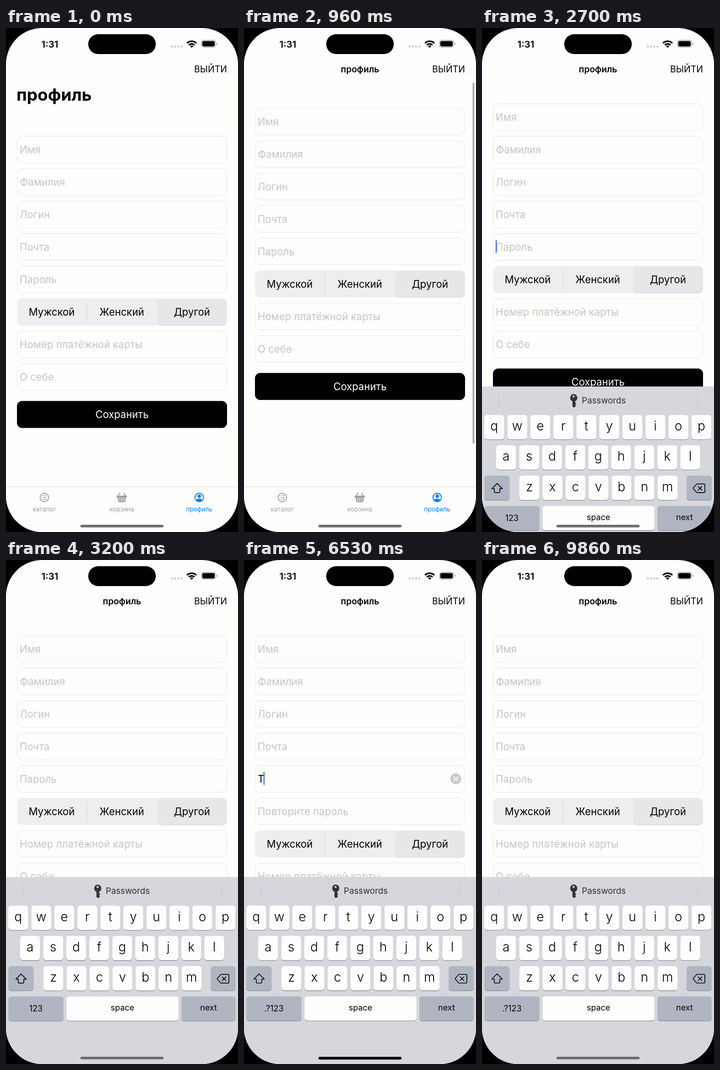
An HTML page that plays this animation: 508 px wide and 1102 px high, repeating every 9960 ms.

```html
<!DOCTYPE html>
<html lang="ru">
<head>
<meta charset="utf-8">
<title>Профиль</title>
<style>
  html, body { margin: 0; width: 100%; height: 100%; overflow: hidden; background: #000; }
  svg { display: block; width: 508px; height: 1102px; }
  text { font-family: Inter, "Noto Sans", sans-serif; font-size: 22.2px; fill: #000; }
  .hint { fill: #c5c5c8; }
  .mid { text-anchor: middle; }
  .box { fill: #fefefd; stroke: #e9e9eb; stroke-width: 1.2; }
  .tab { font-size: 13.6px; fill: #9f9f9f; text-anchor: middle; }
  .small { font-size: 18px; text-anchor: middle; }
  .lower { font-size: 28px; font-weight: 300; text-anchor: middle; }
  .upper { font-size: 25.5px; text-anchor: middle; }
  .line { fill: none; stroke-linecap: round; stroke-linejoin: round; }
</style>
</head>
<body>
<svg viewBox="0 0 508 1102">
  <defs>
    <clipPath id="screen"><rect width="508" height="1102" rx="79"/></clipPath>
    <clipPath id="below"><rect y="119" width="508" height="900"/></clipPath>
    <linearGradient id="grey" x2="0" y2="1">
      <stop stop-color="#484848"/><stop offset="1" stop-color="#939393"/>
    </linearGradient>
  </defs>
  <rect width="508" height="1102"/>
  <g clip-path="url(#screen)">
    <rect width="508" height="1102" fill="#fefefd"/>

    <g clip-path="url(#below)">
      <text id="bigTitle" x="23" y="158.500" style="font-size:37px;font-weight:700">профиль</text>
    </g>
    <text id="navTitle" class="mid" x="254" y="97" style="font-size:19.2px;font-weight:600">профиль</text>
    <text x="484" y="97" text-anchor="end" style="font-size:19.5px">ВЫЙТИ</text>

    <g id="form">
      <g id="fixed"></g>
      <g id="repeat"></g>
      <g id="rest"></g>
      <g id="typed">
        <text x="30" y="558">T</text>
        <circle cx="463.700" cy="549.500" r="11.800" fill="#c9c9cb"/>
        <path class="line" d="M459.500 545.300l8.400 8.400m0-8.400l-8.400 8.400" stroke="#fff" stroke-width="2"/>
      </g>
      <rect id="caret" y="534" width="2.400" height="29" rx="1.200" fill="#4873e6"/>
    </g>
    <rect id="bar" x="500.500" width="4" rx="2" fill="#a9a9ac"/>

    <g>
      <rect y="1003" width="508" height="99" fill="#fefefd"/>
      <rect y="1002.500" width="508" height="1.200" fill="#dededf"/>
      <g class="line" stroke="#9f9f9f" stroke-width="1.900">
        <circle cx="84" cy="1026.500" r="9.300"/>
        <path d="M82 1022.500h6.500m-6.500 4h6.500m-6.500 4h6.500M79 1022.500h.1m-.1 4h.1m-.1 4h.1" stroke-width="1.600"/>
        <path d="M249.500 1016.500l-4 7M257.500 1016.500l4 7"/>
      </g>
      <path d="M242 1022.500h23v3h-2l-2 9.500q-.4 1.800-2 1.800h-11q-1.600 0-2-1.800l-2-9.500h-2z" fill="#9f9f9f"/>
      <path class="line" d="M249 1027.500l.6 6m3.900-6v6m4.500-6l-.6 6" stroke="#fff" stroke-width="1.500"/>
      <circle cx="423" cy="1026.500" r="9.300" fill="none" stroke="#0a7cf5" stroke-width="2"/>
      <circle cx="423" cy="1023.800" r="3.800" fill="#0a7cf5"/>
      <path d="M416 1032.500q1.500-3.600 7-3.600t7 3.600q-3 3.300-7 3.300t-7-3.300z" fill="#0a7cf5"/>
      <text class="tab" x="84" y="1057">каталог</text>
      <text class="tab" x="253.500" y="1057">корзина</text>
      <text class="tab" x="423" y="1057" style="fill:#0a7cf5">профиль</text>
    </g>

    <g id="board">
      <rect width="508" height="420" fill="#d5d7dd"/>
      <path d="M36.500 16v29.500M472 16v29.500" stroke="#c1c3c9" stroke-width="1.200"/>
      <path fill-rule="evenodd" fill="#333437" d="M200.500 16.500a8.300 8.300 0 0 1 3.500 15.800v2.700l2.500 2.500-2.500 2.700 2 2.300-4.600 4-3.400-3.200v-11a8.300 8.300 0 0 1 2.500-15.800zm0 3a2.300 2.300 0 1 0 .01 0z"/>
      <text x="218.500" y="37" style="font-size:18.700px;fill:#2e2f32">Passwords</text>
      <g id="keys"></g>
      <g id="lower"></g>
      <g id="upper"></g>
      <path id="shift" class="line" d="M33 212l11.500 11.500h-5.500v7q0 1.500-1.500 1.500h-9q-1.500 0-1.500-1.500v-7h-5.500z" stroke="#000" stroke-width="1.700"/>
      <path class="line" d="M470.500 213h15q2.500 0 2.500 2.500v14q0 2.500-2.500 2.500h-15l-7.500-8.200q-1-1.300 0-2.600zM473.500 218.500l8 8m0-8l-8 8" stroke="#000" stroke-width="1.700"/>
      <text id="digits" class="small" x="65.500" y="294"></text>
      <text class="small" x="255" y="292">space</text>
      <text class="small" x="443.500" y="292">next</text>
    </g>

    <text x="96" y="42.500" class="mid" style="font-size:20.5px;font-weight:600">1:31</text>
    <rect x="180" y="13.500" width="148" height="43.500" rx="21.750"/>
    <path class="line" d="M363 40.500h.01m6.990 0h.01m6.990 0h.01m6.990 0h.01" stroke="#cfcfcf" stroke-width="4.800"/>
    <g class="line" stroke="#000" stroke-width="3.400" style="stroke-linecap:butt">
      <path d="M396.200 33.200a14.800 14.800 0 0 1 20.600 0M400.200 37.300a9.200 9.200 0 0 1 12.600 0"/>
    </g>
    <path d="M406.500 43.500l-3.700-3.900a5.400 5.400 0 0 1 7.400 0z"/>
    <rect x="427.600" y="26.600" width="31.600" height="15.800" rx="5" fill="none" stroke="#a4a4a4" stroke-width="1.200"/>
    <rect x="429.600" y="28.600" width="27.600" height="11.800" rx="3.300"/>
    <path d="M461 32q2.200.7 2.200 2.600t-2.200 2.600z" fill="#a4a4a4"/>

    <rect x="163" y="1086.500" width="182" height="5.700" rx="2.850" fill="url(#grey)"/>
    <rect id="home" x="163" y="1086.500" width="182" height="5.700" rx="2.850"/>
  </g>
</svg>
<script>
const LOOP = 9960, TOP = 236, PITCH = 71;
const $ = id => document.getElementById(id);
const rect = (x, y, w, h, r, attrs) =>
  `<rect x="${x}" y="${y}" width="${w}" height="${h}" rx="${r}" ${attrs}/>`;
const label = (cls, x, y, s, attrs = '') => `<text class="${cls}" x="${x}" y="${y}" ${attrs}>${s}</text>`;
const rowY = i => TOP + i * PITCH;
const field = (i, s) =>
  rect(24.5, rowY(i) + 0.7, 459, 58.3, 11.5, 'class="box"') + label('hint', 30, rowY(i) + 38, s);

$('fixed').innerHTML = ['Имя', 'Фамилия', 'Логин', 'Почта', 'Пароль'].map((s, i) => field(i, s)).join('');
$('repeat').innerHTML = field(5, 'Повторите пароль');
const passHint = $('fixed').lastElementChild;

const segY = rowY(5);
$('rest').innerHTML =
  rect(24, segY, 460, 59.5, 11, 'fill="#eeeef1"') +
  rect(331, segY + 3, 153, 57, 10, 'fill="#d9d9dc"') +
  rect(331, segY + 1.5, 153, 57, 10, 'fill="#e7e7ea"') +
  rect(176, segY + 8, 1.2, 44, 0, 'fill="#d8d8dc"') +
  ['Мужской', 'Женский', 'Другой'].map((s, i) => label('mid', 100 + i * 153.6, segY + 38, s)).join('') +
  field(6, 'Номер платёжной карты') + field(7, 'О себе') +
  rect(24, 815.5, 460, 59, 11.5, '') +
  label('mid', 254, 853, 'Сохранить', 'style="fill:#fff"');

// Keyboard, measured from its own top edge
const keyY = r => 62.5 + r * 66.2;
const key = (x, r, w, fill = '#fefefe', id = '') =>
  rect(x, keyY(r) + 1.3, w, 53.2, 6, 'fill="#8d9097"') +
  rect(x, keyY(r), w, 53.2, 6, `fill="${fill}" id="${id}"`);
const DARK = '#b0b6c1';
let keys = '', lower = '', upper = '';
[['qwertyuiop', 5], ['asdfghjkl', 31], ['zxcvbnm', 82]].forEach(([row, left], r) => {
  [...row].forEach((c, i) => {
    const x = left + i * 50.4;
    keys += key(x, r, 43.6);
    lower += label('lower', x + 21.8, keyY(r) + 34, c);
    upper += label('upper', x + 21.8, keyY(r) + 36.3, c.toUpperCase());
  });
});
keys += key(5, 2, 55.3, DARK, 'shiftKey') + key(448, 2, 55, DARK) +
  key(5, 3, 121, DARK) + key(132.3, 3, 245.5) + key(384, 3, 119, DARK);
$('keys').innerHTML = keys;
$('lower').innerHTML = lower;
$('upper').innerHTML = upper;

const part = (t, a, b) => Math.min(1, Math.max(0, (t - a) / (b - a)));
const ease = (t, a, b) => { const p = part(t, a, b); return p * p * (3 - 2 * p); };
const spring = (t, a, w) => {
  const x = Math.max(0, t - a) / 1000 * w;
  return 1 - (1 + x) * Math.exp(-x);
};

// Caret fades: start, end; alternately in and out
const blinks = [
  [2400, 2460], [3060, 3200], [3430, 3560], [4060, 4200], [4430, 4560], [5060, 5230],
  [5430, 5500], [6030, 6160], [6360, 6530], [7030, 7160], [7360, 7530], [8030, 8160],
  [8360, 8530], [9030, 9160], [9200, 9230], [9730, 9860]
];
const caretAlpha = t => blinks.reduce((a, [s, e], i) => a + (i % 2 ? -1 : 1) * part(t, s, e), 0);

const show = (id, a) => $(id).setAttribute('opacity', a);
const move = (id, y) => $(id).setAttribute('transform', `translate(0 ${y.toFixed(2)})`);

function draw(t) {
  const scroll = 61.2 * ease(t, 110, 930);
  move('bigTitle', -scroll);
  show('navTitle', part(scroll, 42, 58));
  move('form', -scroll - 9.8 * ease(t, 2400, 2660));

  const barTop = 181 - scroll;
  $('bar').setAttribute('y', barTop);
  $('bar').setAttribute('height', 909 - barTop);
  show('bar', part(t, 100, 200) - part(t, 1000, 1200));

  const open = ease(t, 5500, 5960) - ease(t, 9200, 9640);
  move('rest', PITCH * open - PITCH * 0);
  show('repeat', open);

  const typed = t >= 5500 && t < 9200;
  show('typed', typed ? 1 : 0);
  passHint.setAttribute('opacity', typed ? 0 : 1);
  $('caret').setAttribute('x', typed ? 42.7 : 29.8);
  show('caret', caretAlpha(t));

  move('board', 1102 - 409 * spring(t, 2500, 14.2));
  const caps = t >= 4430 && t < 5500;
  show('lower', caps ? 0 : 1);
  show('upper', caps ? 1 : 0);
  $('shift').style.fill = caps ? '#000' : 'none';
  $('shiftKey').setAttribute('fill', caps ? '#fefefe' : DARK);
  $('digits').textContent = t < 4430 ? '123' : '.?123';

  show('home', part(t, 4400, 4560) - part(t, 9200, 9500));
}

// Lower rows start one slot up; the typed group sits on the fifth row
$('typed').firstElementChild.setAttribute('y', rowY(4) + 38);

function tick() {
  draw(performance.now() % LOOP);
  requestAnimationFrame(tick);
}
tick();
</script>
</body>
</html>
```
